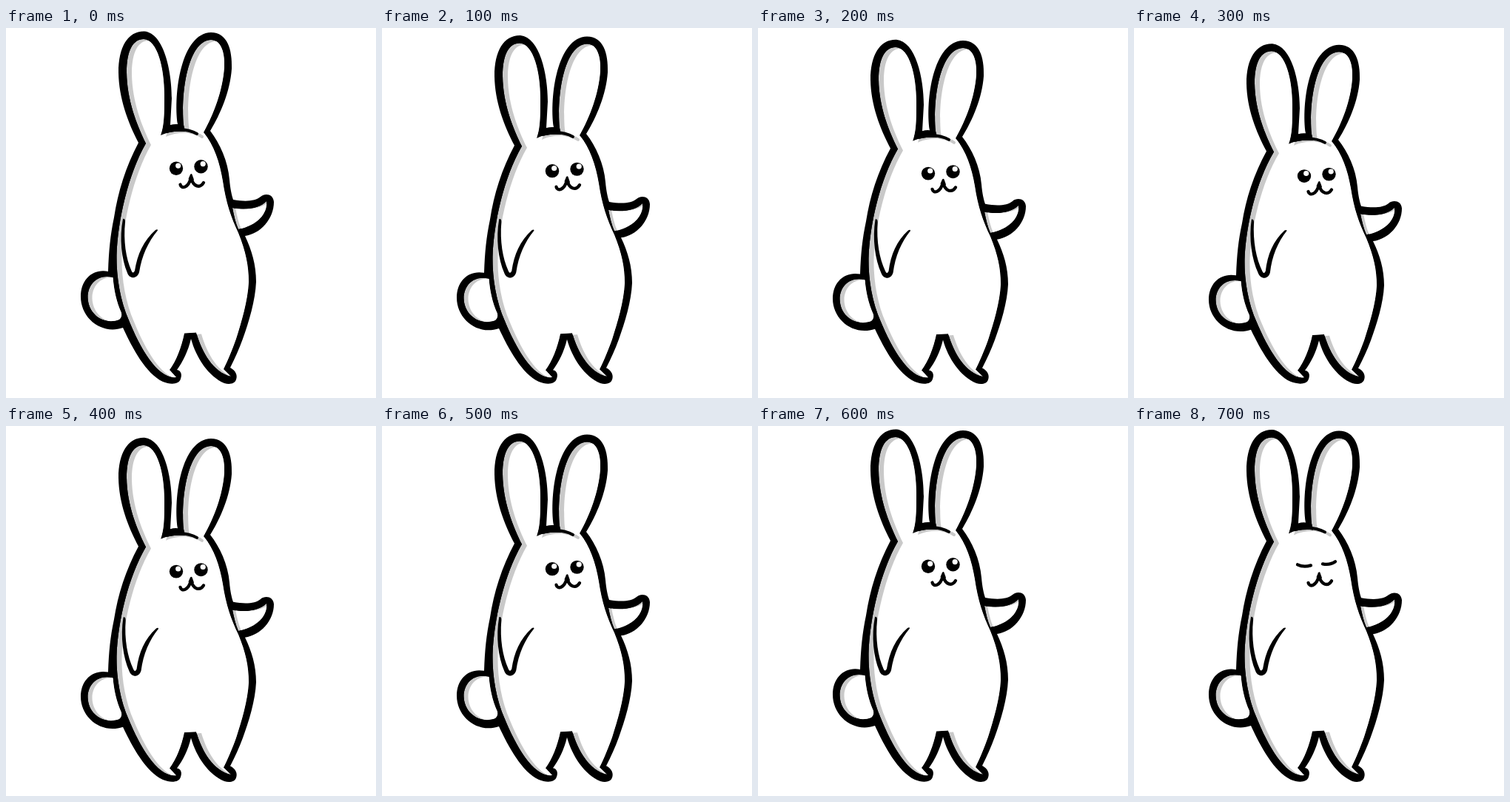
An HTML page with a canvas for the animation above (900 ms loop, 500 px wide and 500 px high).

```html
<!DOCTYPE html>
<html lang="en">
<head>
<meta charset="utf-8">
<title>Rabbit</title>
<style>
  html, body { margin: 0; width: 100%; height: 100%; overflow: hidden; background: #fff; }
  canvas { display: block; width: 500px; height: 500px; }
</style>
</head>
<body>
<canvas id="stage" width="500" height="500"></canvas>
<script>
const canvas = document.getElementById('stage');
const ctx = canvas.getContext('2d');
const ratio = window.devicePixelRatio || 1;
canvas.width = canvas.height = 500 * ratio;

const LOOP = 900, STEP = 100, FLOOR = 481;
const INK = '#000', PAPER = '#fff', SHADE = '#c9c9c9';

const outline = new Path2D(`M179 155 C165 128 152.500 95 152 60 C152 25 165 4 187 4.500
  C213 7 224 57 224 95 L222 131 Q227 129.500 232 130
  C226 88 237 7 277 6 C299 6 306 29 305 55 C303 85 290 116 276 139
  C289 156 300 180 302 205 C303 217 305 226 307 232
  C324 235 337 234 344 228 C350 223 361 224 362 235 C362 258 344 278 323 281
  C332 300 338 320 338 343 C337 368 328 398 320 420 C315 434 309 447 303 459
  C311 463 313 470 311 475 C309 481 302 482 295 480
  C274 471 257 446 250 420 C246 437 239 451 231 462
  C237 463 238 469 236 474 C234 482 222 482 212 478
  C189 467 171 433 158 405 C129 415 101 392 101 363 C101 340 117 325 138 329
  C139 300 141 280 146 256 C151 222 162 187 179 155 Z`);

const body = new Path2D(`M189 156 C177 131 163.500 98 163 60 C163 30 172 15 186 15
  C205 16 214 55 214 90 C214 116 214 131 209 145 C219 140 230 139 242 140
  L240 131 C236 87 246 17 277 16 C291 16 296 34 295 53 C293 84 281 116 267 141
  C281 158 289 182 293 207 C297 235 304 256 314 277
  C324 302 328 321 328 343 C327 368 318 398 311 420 C306 434 300 449 294 461 L304 471
  C280 465 265 439 257 411.500 L241 412.500 C237 432 230 450 221 462 L230 472
  C205 475 181 432 166 395 C154 368 149 335 149.500 307
  C151 260 165 198 189 156 Z`);

const tail = new Path2D(`M144.500 337 C124 332 110.500 346 110.500 364
  C111 387 132 402 153 394 Q157 391 156 385 C149 369 146 354 144.500 337 Z`);

const hand = new Path2D(`M306 243 C325 247 344 243 352 234 C354 251 339 267 314 272
  C310 263 308 253 306 243 Z`);

const arm = new Path2D(`M158 258 Q161 257 161 262 C158.500 288 162 311 169.500 328
  Q171.500 333 174 328 C177.500 306 186 287 202 273 Q205 271.500 205 273.500
  C192 289 183.500 308 180 330 C177 339.500 167 339.500 164 331
  C156 312 153 284 158 258 Z`);

const brow = new Path2D('M233 137 Q249 137.500 258 143');
const browShade = new Path2D('M246 140 Q258 142 265 147');
const mouth = new Path2D('M235.500 211.500 C237 218 246.500 216.500 250 202 C253 215.500 262.500 216.500 267 209');
const nose = new Path2D('M246.500 204 L249 198 Q250.500 196 251.500 198 L254 205 L250.500 209 Z');
const lids = new Path2D('M221 187 Q229 191 239 188 M255 186 Q265 188 272 183');

function fill(path, color) {
  ctx.fillStyle = color;
  ctx.fill(path);
}

function stroke(path, width, color = INK) {
  ctx.lineWidth = width;
  ctx.strokeStyle = color;
  ctx.stroke(path);
}

function dot(x, y, r, color) {
  ctx.fillStyle = color;
  ctx.beginPath();
  ctx.arc(x, y, r, 0, Math.PI * 2);
  ctx.fill();
}

// White shape with a shaded left rim
function shaded(path, dx, dy) {
  ctx.save();
  ctx.clip(path);
  fill(path, SHADE);
  ctx.translate(dx, dy);
  fill(path, PAPER);
  ctx.restore();
}

function eye(x, y) {
  dot(x, y, 9.2, INK);
  dot(x + 2.7, y - 3.7, 3.6, PAPER);
}

function draw(squash, blink) {
  ctx.setTransform(ratio, 0, 0, ratio, 0, 0);
  ctx.fillStyle = PAPER;
  ctx.fillRect(0, 0, 500, 500);
  ctx.lineCap = ctx.lineJoin = 'round';

  ctx.save();
  ctx.translate(0, FLOOR);
  ctx.scale(1, 1 - 0.0117 * squash);
  ctx.translate(0, -FLOOR);
  fill(outline, INK);
  shaded(body, 7, 2);
  shaded(tail, 6, 1);
  shaded(hand, 4, 0);
  stroke(browShade, 4, SHADE);
  stroke(brow, 4);
  if (blink) {
    stroke(lids, 4.3);
  } else {
    eye(230, 189.8);
    eye(263.5, 187.3);
  }
  stroke(mouth, 4.3);
  fill(nose, INK);
  ctx.restore();

  // The near arm stays put and only leans a little
  const lean = 0.014 * squash;
  ctx.transform(1, 0, lean, 1, 0.3 * squash - 259 * lean, 0.2 * squash);
  fill(arm, INK);
}

function tick(now) {
  const step = Math.floor((now % LOOP) / STEP);
  const blink = step > 6;
  draw(blink ? 0.1 : 3 - Math.abs(3 - step), blink);
  requestAnimationFrame(tick);
}
requestAnimationFrame(tick);
</script>
</body>
</html>
```
